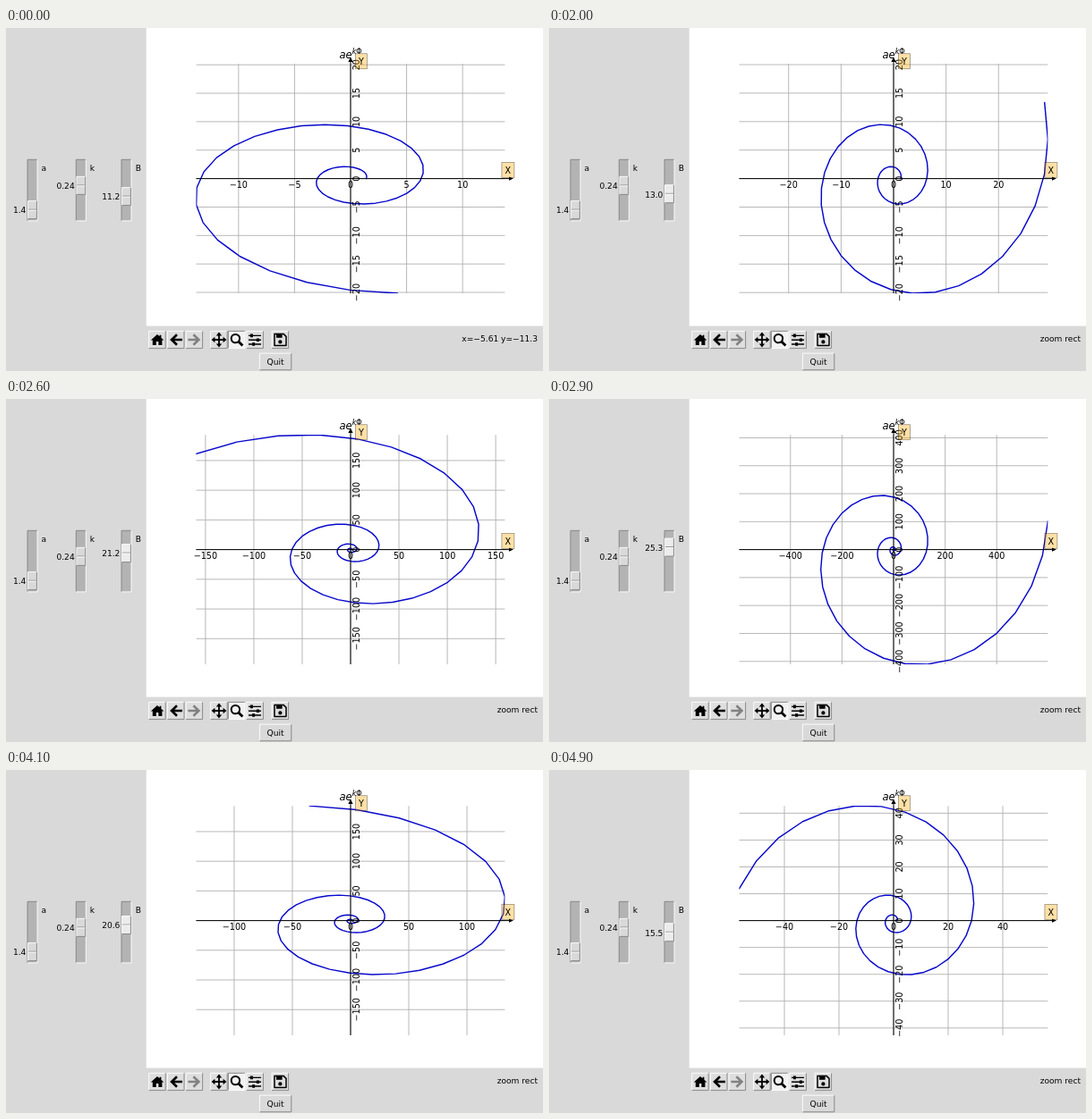
Write an HTML page that moves like this. It is 600 px wide and 384 px high and loops after 5000 ms.

```html
<!DOCTYPE html>
<html lang="en">
<head>
<meta charset="utf-8">
<title>Logarithmic spiral</title>
<style>
  html, body { margin: 0; width: 100%; height: 100%; overflow: hidden; background: #d9d9d9; }
  svg { display: block; width: 600px; height: 384px; }
  text { font: 9.1px "DejaVu Sans", sans-serif; fill: #000; }
  .tick { font-size: 9.65px; text-anchor: middle; }
  .end { text-anchor: end; }
  .mid { text-anchor: middle; }
  .math { font-size: 11.6px; font-style: oblique; }
  .sup { font-size: 8.1px; }
  .up { font-style: normal; }
  #grid { stroke: #b0b0b0; stroke-width: .9; fill: none; }
  #curve { stroke: #0808cc; stroke-width: 1.45; fill: none; stroke-linejoin: round; stroke-linecap: square; }
  .axis { stroke: #000; stroke-width: 1; fill: none; }
  .tag { fill: #ffa500; fill-opacity: .35; stroke: #000; stroke-opacity: .4; stroke-width: .8; }
  .hi { stroke: #fff; stroke-width: .9; fill: none; }
  .lo { stroke: #828282; stroke-width: .9; fill: none; }
</style>
</head>
<body>
<svg viewBox="0 0 600 384">
  <defs>
    <clipPath id="box"><rect x="212.4" y="40" width="345" height="257"/></clipPath>
  </defs>
  <rect width="600" height="384" fill="#d9d9d9"/>
  <rect x="156.7" width="443.3" height="333.6" fill="#fff"/>

  <path id="grid"/>
  <path id="curve" clip-path="url(#box)"/>
  <path class="axis" d="M212.4 168.6H564M385 297V36"/>
  <path d="M567 168.6l-5-2.2v4.4zM385 32.5l-2.6 5.5h5.2z"/>
  <g id="labels"></g>
  <text class="math" x="372.4" y="33.8">ae<tspan class="sup" dy="-4.6">k<tspan class="up">Φ</tspan></tspan></text>
  <rect class="tag" x="390.4" y="28.7" width="13" height="17"/>
  <text class="tick" x="396.9" y="40.8">Y</text>
  <rect class="tag" x="553.9" y="150.4" width="14" height="17"/>
  <text class="tick" x="560.9" y="162.6">X</text>

  <g id="scales"></g>
  <g id="buttons"></g>

  <path d="M169 343l-7.2 6.6h2v5.4h4v-4h2.6v4h4v-5.4h2l-3-2.8v-3h-1.8v1.4z"/>
  <path id="arrow" d="M191 343.2l-6 5.8 6 5.8M185.6 349H197" fill="none" stroke="#000" stroke-width="2.6"/>
  <path d="M209.4 343.2l6 5.8-6 5.8M214.8 349H203.4" fill="none" stroke="#828282" stroke-width="2.6"/>
  <path d="M238 343v12M232 349h12" stroke="#000" stroke-width="1.8"/>
  <path d="M238 340.6l3.2 3.8h-6.4zM238 357.4l3.2-3.8h-6.4zM229.6 349l3.8-3.2v6.4zM246.4 349l-3.8-3.2v6.4z"/>
  <circle cx="256.4" cy="347.6" r="4.7" fill="none" stroke="#000" stroke-width="2"/>
  <path d="M260 351.2l4.4 4.4" stroke="#000" stroke-width="2.8"/>
  <path d="M271 344.4h14M271 349.2h14M271 354h14" stroke="#000" stroke-width="1.4"/>
  <path d="M274.4 342.6v3.6M281.4 347.4v3.6M276.6 352.2v3.6" stroke="#000" stroke-width="3"/>
  <path d="M300 342.4h10l3 3v10.2h-13z" fill="none" stroke="#000" stroke-width="1.5" stroke-linejoin="round"/>
  <path d="M302 343h6.6v3.8H302z"/>
  <circle cx="306.4" cy="351.4" r="2.1"/>

  <text class="end" id="status" x="594" y="351.4"></text>
  <text class="mid" x="301" y="377">Quit</text>
</svg>
<script>
const LOOP = 5000, STEP = 100;
const A = 1.4, K = 0.24;
const CX = 385, CY = 168.6, HALF_W = 172.4, HALF_H = 128.4;
const REST = 11.2, SLIDE_AT = 1700;
// slider value at every 100 ms from SLIDE_AT on
const SLIDE = [
  11.2, 11.5, 12.1, 13, 14.2, 15.5, 16.8,
  18.2, 19.7, 21.2, 22.8, 24.2, 25.3,
  25.5, 25.6, 25.7, 25.7, 25.7, 25.7,
  25.4, 24.8, 23.9, 22.9, 21.7, 20.6,
  19.7, 18.8, 17.9, 17.1, 16.4, 16, 15.7, 15.5
];
const LEAVE_AT = 700;

const $ = id => document.getElementById(id);
const minus = s => String(s).replace("-", "\u2212");

// raised (or sunken) box in the toolkit's plain style
function bevel(x, y, w, h, fill, sunken) {
  const [tl, br] = sunken ? ["lo", "hi"] : ["hi", "lo"];
  return `<rect x="${x}" y="${y}" width="${w}" height="${h}" fill="${fill}"/>` +
    `<path class="${tl}" d="M${x} ${y + h}V${y}H${x + w}"/>` +
    `<path class="${br}" d="M${x} ${y + h}H${x + w}V${y}"/>`;
}

function scale(x, name, nameX, value, y, fill) {
  return bevel(x, 147.3, 11, 68.6, "#b3b3b3", true) +
    bevel(x + .6, y - 10, 9.8, 20, fill) +
    `<path class="lo" d="M${x + 1} ${y - .4}h9"/><path class="hi" d="M${x + 1} ${y + .5}h9"/>` +
    `<text class="end" x="${x - 1.6}" y="${y + 3.8}">${value}</text>` +
    `<text x="${nameX}" y="160.2">${name}</text>`;
}

function tickStep(limit) {
  const raw = 2 * limit / 9;
  const mag = 10 ** Math.floor(Math.log10(raw));
  return [1, 2, 2.5, 5, 10].map(s => s * mag).find(s => s >= raw);
}

function ticks(limit) {
  const step = tickStep(limit), n = Math.floor(limit / step), list = [];
  for (let i = -n; i <= n; i++) {
    list.push([i * step, minus((i * step).toFixed(step % 1 ? 1 : 0))]);
  }
  return list;
}

function spiral(b) {
  const n = 5 * Math.floor(b);
  return Array.from({ length: n }, (_, i) => {
    const phi = b * i / (n - 1), r = A * Math.exp(K * phi);
    return [r * Math.cos(phi), r * Math.sin(phi)];
  });
}

function drawPlot(b) {
  const pts = spiral(b);
  const maxX = Math.max(...pts.map(p => Math.abs(p[0])));
  const maxY = Math.max(...pts.map(p => Math.abs(p[1])));
  const px = x => (CX + x / maxX * HALF_W).toFixed(2);
  const py = y => (CY - y / maxY * HALF_H).toFixed(2);
  let grid = "", labels = "";
  for (const [v, s] of ticks(maxX)) {
    grid += `M${px(v)} ${CY - HALF_H}v${2 * HALF_H}`;
    labels += `<text class="tick" x="${px(v)}" y="179">${s}</text>`;
  }
  for (const [v, s] of ticks(maxY)) {
    grid += `M${CX - HALF_W} ${py(v)}h${2 * HALF_W}`;
    labels += `<text class="tick" transform="translate(395.4 ${py(v)}) rotate(-90)">${s}</text>`;
  }
  $("grid").setAttribute("d", grid);
  $("labels").innerHTML = labels;
  $("curve").setAttribute("d", "M" + pts.map(p => px(p[0]) + " " + py(p[1])).join("L"));
}

function drawScales(b, active) {
  $("scales").innerHTML =
    scale(24, "a", 39.6, "1.4", 203.6, "#d9d9d9") +
    scale(78.3, "k", 93.8, "0.24", 176.4, "#d9d9d9") +
    scale(129, "B", 144.8, b.toFixed(1), 188.6 - (b - REST) * 1.6, active ? "#ececec" : "#d9d9d9");
}

// pointer position while it is still over the axes
function status(t) {
  if (t >= LEAVE_AT) return "zoom rect";
  const p = (t / LEAVE_AT) ** 2;
  const x = -5.61 - 8 * p, y = -11.3 + 6 * p;
  return `x=${minus(x.toPrecision(3))} y=${minus(y.toPrecision(3))}`;
}

function render(t) {
  const b = t < SLIDE_AT ? REST : SLIDE[(t - SLIDE_AT) / STEP];
  drawPlot(b);
  drawScales(b, t >= SLIDE_AT);
  $("status").textContent = status(t);
}

$("buttons").innerHTML =
  [159.6, 180.4, 201, 228.6, 268.8, 297].map(x => bevel(x, 339.4, 18.6, 19.2, "#dedede")).join("") +
  bevel(248.4, 339.4, 18.6, 19.2, "#f2f2f2", true) +
  bevel(283.4, 364.2, 35.4, 18.6, "#d9d9d9");

let shown = -1;
function frame() {
  const t = Math.floor(performance.now() % LOOP / STEP) * STEP;
  if (t !== shown) render(shown = t);
  requestAnimationFrame(frame);
}
frame();
</script>
</body>
</html>
```
